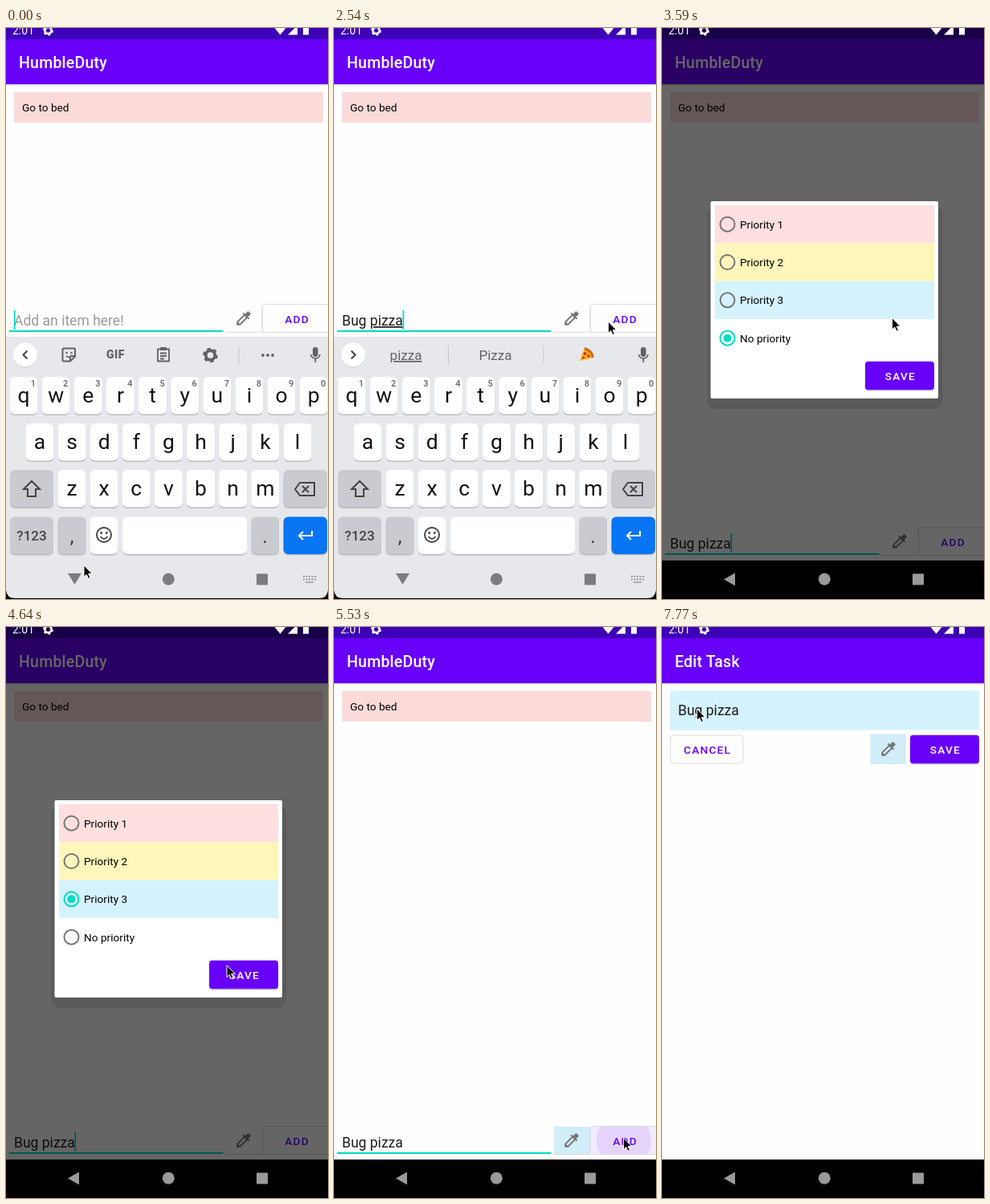
An HTML page for the animation above (8000 ms loop, 401 by 712 pixels).

```html
<!DOCTYPE html>
<html lang="en">
<head>
<meta charset="utf-8">
<title>To-do app</title>
<style>
  html, body { margin: 0; width: 100%; height: 100%; overflow: hidden; background: #000; }
  svg { display: block; width: 100%; height: 100%; }
  text { font-family: Roboto, sans-serif; white-space: pre; }
  .u { text-decoration: underline; }
</style>
</head>
<body>
<svg id="stage" viewBox="0 0 401 712"></svg>
<script>
const LOOP = 8000;
const PURPLE = '#6800f9', TEAL = '#00d9c3', BLUE = '#d1edf9', GREY = '#5f6368';

// Markup helpers
const rect = (x, y, w, h, fill, r = 0, more = '') =>
  `<rect x="${x}" y="${y}" width="${w}" height="${h}" rx="${r}" fill="${fill}" ${more}/>`;
const circle = (x, y, r, fill, more = '') =>
  `<circle cx="${x}" cy="${y}" r="${r}" fill="${fill}" ${more}/>`;
const path = (d, fill, more = '') => `<path d="${d}" fill="${fill}" ${more}/>`;
const line = (d, color, w = 2, more = '') =>
  path(d, 'none', `stroke="${color}" stroke-width="${w}" ${more}`);
const text = (x, y, s, size, fill = '#000', more = '') =>
  `<text x="${x}" y="${y}" font-size="${size}" fill="${fill}" ${more}>${s}</text>`;
const mid = (x, y, s, size, fill, more = '') =>
  text(x, y, s, size, fill, `text-anchor="middle" ${more}`);
const group = (id, body, more = '') => `<g id="${id}" ${more}>${body}</g>`;
const label = (x, y, s, fill) =>
  mid(x + .6, y, s, 13.65, fill, 'font-weight="500" letter-spacing="1.22"');
const title = s => text(16, 50, s, 19.5, '#fff', 'font-weight="500" letter-spacing=".24"');
const outline = (x, y, w, h) => rect(x, y, w, h, '#fefefe', 4, 'stroke="#dcdcde"');
const solid = (x, y, s) =>
  rect(x, y + 1.5, 86, 35.5, '#000', 4, 'opacity=".16"') +
  rect(x, y, 86, 35.5, PURPLE, 4) + label(x + 43.3, y + 22.8, s, '#fff');
const gear = (x, y, r, color) =>
  circle(x, y, r * .64, 'none', `stroke="${color}" stroke-width="${r * .42}"`) +
  circle(x, y, r * .9, 'none', `stroke="${color}" stroke-width="${r * .28}" pathLength="12" stroke-dasharray="1 1"`);
const dropper = (x, y) => path('M20.71 5.63l-2.34-2.34c-.39-.39-1.02-.39-1.41 0l-3.12 3.12-1.93-1.91-1.41 1.41 1.42 1.42L3 16.25V21h4.75l8.92-8.92 1.42 1.42 1.41-1.41-1.92-1.92 3.12-3.12c.4-.4.4-1.03.01-1.42zM6.92 19L5 17.08l8.06-8.06 1.92 1.92L6.92 19z',
  '#777', `transform="translate(${x - 11.7} ${y - 11.7}) scale(.975)"`);

const header = name =>
  rect(0, 70, 401, 1, '#ccc') + rect(0, 71, 401, 1, '#ececec') +
  rect(0, 14, 401, 56, PURPLE) + title(name);

const item = (id, y, fill, s) =>
  group(id, rect(10, y, 385, 38, fill) + text(20, y + 24, s, 13.65));

function inputBar() {
  return rect(0, 344, 401, 42, '#fefefe') +
    rect(4, 377, 266.5, 2, TEAL) +
    text(10, 371, 'Add an item here!', 17.55, '#9a9a9a', 'id="hint"') +
    `<text id="entry" x="10" y="371" font-size="17.55" fill="#1c1c1c"><tspan id="done"></tspan><tspan id="word"></tspan></text>` +
    rect(0, 352, 1.8, 24, TEAL, 0, 'id="caret"') +
    rect(274, 346, 45.5, 34, '#d8d8d8') +
    rect(274, 345, 44.5, 34, '#fefefe', 0, 'id="tint"') + dropper(296, 362) +
    outline(319.5, 344.5, 90, 35) +
    group('ripple', rect(320, 345, 90, 34, '#f2ebfd', 3) + circle(361, 362, 34, '#e4d4fb', 'clip-path="url(#addClip)"')) +
    label(362, 367.5, 'ADD', PURPLE);
}

function keyboard() {
  let s = rect(0, 385, 401, 327, '#000') +
    path('M0 385H401V701Q400 711 390 711H11Q1 711 0 701Z', '#e7e8ec');
  const key = (x, y, w, fill = '#fff') =>
    rect(x, y + 1, w, 47, '#babcc2', 6) + rect(x, y, w, 46.5, fill, 6);
  ['qwertyuiop', 'asdfghjkl', 'zxcvbnm'].forEach((row, r) => {
    [...row].forEach((ch, i) => {
      const x = [22, 42, 82][r] + i * 40.13, y = 435 + r * 58;
      s += key(x - 17.5, y, 35) + mid(x, y + 31.5, ch, 26.5, '#111');
      if (!r) s += mid(x + 12, 447, (i + 1) % 10, 11, GREY, 'font-weight="500"');
    });
  });
  const dark = '#c9cbd1';
  s += key(5, 551, 54, dark) + key(345.5, 551, 54.5, dark) +
    key(5, 609.5, 54, dark) + key(64.5, 609.5, 35, dark) + key(104.5, 609.5, 35) +
    key(145, 609.5, 155) + key(305.5, 609.5, 34.5, dark) + key(345.5, 609.5, 54.5, '#0875f2');
  s += line('M32 565l10 10h-5v9h-10v-9h-5z', '#444', 2) +
    line('M366 567h18v16h-18l-6-8zM369 571l8 8m0-8l-8 8', '#444', 2) +
    mid(32, 639, '?123', 17, '#444', 'font-weight="500"') +
    mid(82, 642, ',', 24, '#333') + mid(322.5, 642, '.', 24, '#333') +
    circle(122, 632, 9, 'none', 'stroke="#444" stroke-width="2"') +
    circle(118.7, 629.5, 1.5, '#444') + circle(125.3, 629.5, 1.5, '#444') +
    line('M117.5 634q4.5 6 9 0', '#444', 1.8) +
    line('M381 627v6h-16m5-5l-5 5 5 5', '#fff', 2);
  // Mic
  s += rect(382, 398, 6.5, 12, GREY, 3.2) + line('M379.5 407a5.8 5.8 0 0 0 11.5 0M385.3 413v4', GREY, 1.8);
  s += circle(24, 408.5, 15, '#c9cbd1') + circle(24, 407.5, 15, '#fff') +
    line('M26.5 402.5l-5 5 5 5', '#444', 2, 'id="chevron"');
  s += group('tools',
    line('M72 399.5h13q1 0 1 1v9l-6 6h-8q-1.500 0-1.500-1.500v-13q0-1.500 1.500-1.500zM86 409h-5q-1 0-1 1v5', GREY, 2) +
    circle(75.5, 405, 1.3, GREY) + circle(81.5, 405, 1.3, GREY) + line('M75 409q2 2 4 1', GREY, 1.5) +
    mid(136.5, 412, 'GIF', 14, GREY, 'font-weight="900" letter-spacing=".6"') +
    line('M189 400.500h14v15h-14zM192 405.500h8m-8 3.500h8m-8 3.500h5', GREY, 1.8) + rect(192, 398, 8, 4, GREY, 1) +
    gear(254.500, 408, 9, GREY) + rect(289.500, 397, 1, 22, '#c4c6ca') +
    [320, 326, 332].map(x => circle(x, 408, 1.9, GREY)).join(''));
  s += group('chips', rect(142, 396, 1, 23, '#c4c6ca') + rect(260.5, 396, 1, 23, '#c4c6ca') +
    mid(89.5, 414, '', 17, GREY, 'id="chip1" class="u"') + mid(201, 414, '', 17, GREY, 'id="chip2"') +
    mid(314, 414, '', 17, GREY, 'id="chip3"') +
    group('slice', path('M306 415L312 399Q322 402 323 411Z', '#fbb01f') +
      line('M312 399.500Q321.500 402.500 322.500 411', '#c96a1b', 3) +
      circle(312.500, 406, 2, '#d92f20') + circle(317, 409, 1.800, '#d92f20') + circle(310.500, 411, 1.500, '#d92f20')));
  // Navigation row
  s += path('M77 680H94L85.500 694Z', '#7b7c80') + circle(202.3, 687.3, 7.5, '#7b7c80') + rect(312, 680.5, 14, 14, '#7b7c80', 1) +
    line('M370 684h16M370 687.500h16', '#999ba0', 2, 'stroke-dasharray="2 1.5"') + rect(373, 690.500, 10, 1.500, '#999ba0');
  return s;
}

function dialog() {
  const rows = [['Priority 1', '#ffdfe0'], ['Priority 2', '#fef6ba'], ['Priority 3', '#d5f3ff'], ['No priority', '#fff']];
  return rect(56.500, 222, 293, 253, '#000', 12, 'opacity=".11"') +
    rect(60.5, 216, 283.5, 246, '#fff', 2) +
    rows.map(([s, fill], i) => {
      const y = 221 + i * 47.33, cy = y + 23.7;
      return rect(66, y, 273, 47.4, fill) + text(97, cy + 5, s, 13.65) +
        circle(81.5, cy, 9, 'none', `id="ring${i}" stroke-width="2"`) +
        circle(81.5, cy, 5, TEAL, `id="dot${i}"`);
    }).join('') + solid(253, 415.7, 'SAVE');
}

const navBar = rect(0, 664, 401, 48, '#000') +
  path('M77 687.500L91 679.500V695.500Z', '#9a9a9a', 'id="back"') +
  circle(202.3, 687.3, 7.5, '#9a9a9a') + rect(312, 680.5, 14, 14, '#9a9a9a', 1);

const editPage = rect(0, 14, 401, 650, '#fefefe') + header('Edit Task') +
  rect(10, 79.5, 385, 49, '#d4f3fe') + text(20, 110, 'Bug pizza', 17.55, '#1c1c1c') +
  outline(10.5, 135, 90.5, 35) + label(56, 157.5, 'CANCEL', PURPLE) +
  rect(260, 134, 43.5, 36.5, BLUE, 0, 'stroke="#c9effb"') + dropper(282, 152) +
  solid(309, 134.7, 'SAVE');

const statusIcons = text(8, 8, '2:01', 14, '#fff') + gear(52.5, 3, 6.3, '#fff') +
  path('M334.500 0H348.500L341.500 8.500ZM351 8.500L363 -3.500V8.500ZM370 -2H377V8.500H370Z', '#fff');

document.getElementById('stage').innerHTML =
  '<clipPath id="addClip"><rect x="320" y="345" width="81" height="34"/></clipPath>' +
  rect(0, 0, 401, 712, '#fefefe') + rect(0, 0, 401, 14, '#3d00b7') + header('HumbleDuty') +
  item('item1', 80, '#fddada', 'Go to bed') + item('item2', 128, BLUE, 'Bug pizza') +
  rect(10, 128, 385, 38, '#000', 0, 'id="press" opacity=".1"') +
  group('input', inputBar()) + group('keys', keyboard()) +
  group('edit', editPage) + rect(0, 0, 401, 664, '#000', 0, 'id="dim"') +
  group('nav', navBar) + group('dialog', dialog()) + statusIcons +
  path('M0 0V14.5L3.300 11.500 5.500 16.500 7.900 15.500 5.700 10.600H10.300Z', '#000', 'id="mouse" stroke="#fff" stroke-width="1"');

// Step tables: each row holds until the next one
const ENTRY = [[0, ''], [150, 'B'], [450, 'Bu'], [600, 'Bug'], [900, 'Bug '], [1200, 'Bug pi'],
  [1500, 'Bug piz'], [1800, 'Bug pizz'], [2100, 'Bug pizza'], [5680, '']];
const CHIPS = [[0], [150, 'B', 'Be', 'But'], [450, 'Bu', 'But', 'Buy'], [600, 'Bug', 'Bugs', 'Buggy'],
  [900, 'in', 'and', 'the'], [1200, 'pi', 'pizza', 'pick'], [1500, 'piz', 'pizza', ''],
  [1800, 'pizz', 'pizza', ''], [2100, 'pizza', 'Pizza', '']];
const MOUSE = [[0, 97, 670], [1950, 150, 600], [2100, 230, 480], [2250, 310, 390], [2400, 339, 367],
  [2540, 341.5, 366], [2690, 315, 364], [2840, 290, 362], [2990, 286.5, 361.5],
  [3740, 240, 352], [3890, 150, 342], [4040, 120, 340], [4340, 190, 374], [4490, 260, 415], [4640, 275, 422],
  [4790, 292, 470], [4940, 335, 580], [5090, 364, 634], [5240, 360.5, 637],
  [5830, 352, 590], [5980, 320, 440], [6130, 275, 270], [6280, 243, 180], [6430, 232, 157], [6580, 232.5, 153.5],
  [7180, 205, 149], [7330, 140, 132], [7480, 80, 112], [7630, 50, 104], [7770, 43.5, 102]];
// time, dim, dialog shift, dialog opacity
const POPUP = [[0, 0, -139, 0], [2990, .1, -139, .5], [3140, .25, -115, 1], [3290, .4, -55.5, 1],
  [3440, .54, -10, 1], [3590, .6, 0, 1], [4790, .3, 0, .4], [4940, 0, 0, 0]];
const TURN = [[0, -90], [3290, -55], [3440, -12], [3590, 0]];
const EDIT = [[0, 0, .9], [7030, .6, .96], [7180, 1, .99], [7330, 1, 1]];
const CARET_OFF = [[2600, 2840], [5240, 5680], [6130, 6580]];

const $ = {};
document.querySelectorAll('[id]').forEach(el => $[el.id] = el);
const at = (table, t) => table.findLast(row => row[0] <= t);
const show = (el, on) => el.style.display = on ? '' : 'none';
const put = (el, s) => { if (el.textContent !== s) el.textContent = s; };
const move = (el, value) => el.setAttribute('transform', value);

function render(t) {
  const entry = at(ENTRY, t)[1], split = t < 2990 ? entry.lastIndexOf(' ') + 1 : entry.length;
  put($.done, entry.slice(0, split));
  put($.word, entry.slice(split));
  $.word.setAttribute('class', 'u');
  show($.hint, !entry);
  show($.caret, !CARET_OFF.some(([a, b]) => t >= a && t < b));
  $.caret.setAttribute('x', entry ? 9.6 + $.entry.getComputedTextLength() : 9.8);

  const [, a, b, c] = at(CHIPS, t);
  show($.tools, !a);
  show($.chips, a);
  [a, b, c].forEach((s, i) => put($['chip' + (i + 1)], s || ''));
  show($.slice, a && !c);
  move($.chevron, a ? 'rotate(180 24 407.5)' : '');

  const closed = t >= 3140;
  show($.keys, !closed);
  show($.nav, closed);
  move($.input, closed ? 'translate(0 278)' : '');
  move($.back, `rotate(${at(TURN, t)[1]} 86 687.5)`);

  const [, dim, shift, alpha] = at(POPUP, t);
  $.dim.setAttribute('opacity', dim);
  $.dialog.setAttribute('opacity', alpha);
  move($.dialog, `translate(0 ${shift})`);
  const chosen = t < 4190 ? 3 : 2;
  for (let i = 0; i < 4; i++) {
    $['ring' + i].setAttribute('stroke', i === chosen ? TEAL : '#777');
    show($['dot' + i], i === chosen);
  }
  $.tint.setAttribute('fill', t < 4790 ? '#fefefe' : BLUE);
  show($.ripple, t >= 5530 && t < 5830);
  show($.item2, t >= 5680);
  show($.press, t >= 6880 && t < 7180);

  const [, fade, scale] = at(EDIT, t);
  $.edit.setAttribute('opacity', fade);
  move($.edit, `translate(200.5 339) scale(${scale}) translate(-200.5 -339)`);
  const [, x, y] = at(MOUSE, t);
  move($.mouse, `translate(${x} ${y})`);
}

const start = performance.now();
function tick() {
  render((performance.now() - start) % LOOP);
  requestAnimationFrame(tick);
}
tick();
</script>
</body>
</html>
```
